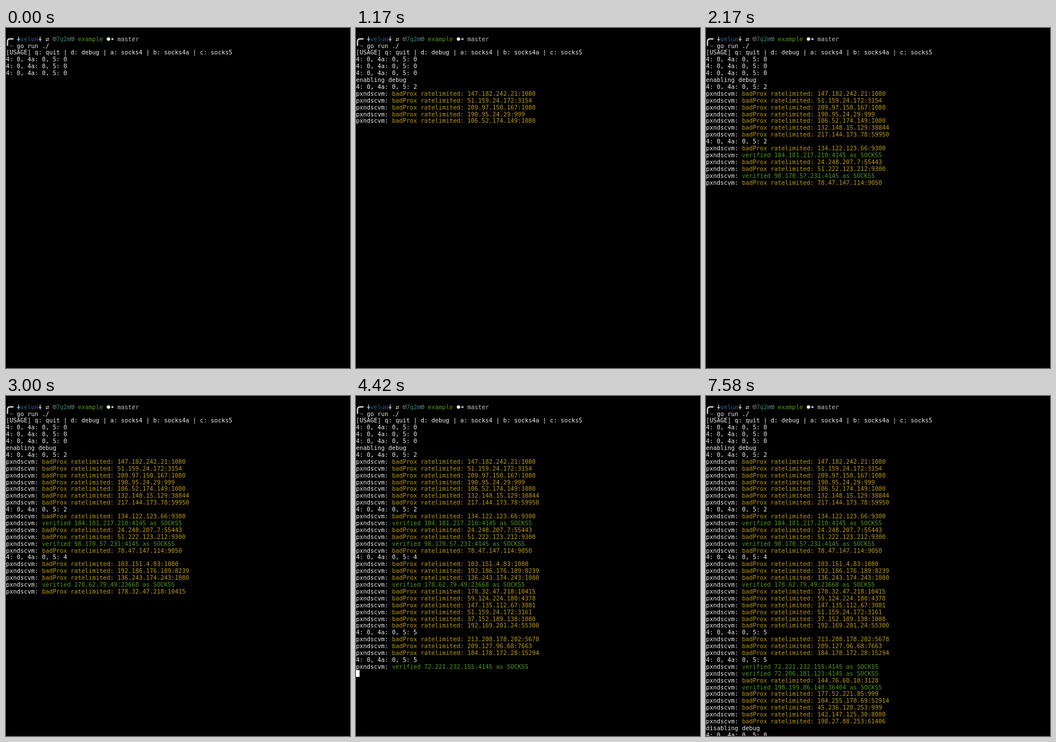
Animation of 600 by 592 pixels, one loop 8000 ms. Source, as an HTML page with a canvas:

```html
<!DOCTYPE html>
<html lang="en">
<head>
<meta charset="utf-8">
<title>Terminal session</title>
<style>
html, body { margin: 0; width: 100%; height: 100%; overflow: hidden; background: #000; }
canvas { display: block; }
</style>
</head>
<body>
<canvas id="stage" width="600" height="592"></canvas>
<script>
const ctx = document.getElementById('stage').getContext('2d');
const LOOP = 8000, CELL = 6.265, ROW = 11.9, TOP = 13.1, BASE = 9.5;
const BLINK = { start: 170, period: 1060, on: 530 };
const WHITE = '#eeeeec', YELLOW = '#bd9b0c', GREEN = '#4e9a16';

const plain = (time, text) => ({ time, text });
const tagged = (time, text, color) => ({ time, text: 'pxndscvm: ', tail: text, color });
const bad = (time, addr) => tagged(time, 'badProx ratelimited: ' + addr, YELLOW);
const good = (time, addr) => tagged(time, 'verified ' + addr + ' as SOCKS5', GREEN);
const count = (time, n) => plain(time, '4: 0, 4a: 0, 5: ' + n);

// Rows below the two prompt lines, each with the time it is printed.
const log = [
  plain(0, '[USAGE] q: quit | d: debug | a: socks4 | b: socks4a | c: socks5'),
  count(0, 0), count(0, 0), count(0, 0),
  plain(330, 'enabling debug'),
  count(330, 2),
  bad(580, '147.182.242.21:1080'),
  bad(670, '51.159.24.172:3154'),
  bad(830, '209.97.150.167:1080'),
  bad(915, '190.95.24.29:999'),
  bad(1165, '106.52.174.149:1080'),
  bad(1250, '132.148.15.129:38844'),
  bad(1330, '217.144.173.78:59950'),
  count(1330, 2),
  bad(1415, '134.122.123.66:9300'),
  good(1750, '184.181.217.210:4145'),
  bad(1915, '24.248.207.7:55443'),
  bad(2000, '51.222.123.212:9300'),
  good(2080, '98.170.57.231:4145'),
  bad(2165, '78.47.147.114:9050'),
  count(2330, 4),
  bad(2500, '103.151.4.83:1080'),
  bad(2750, '192.186.176.189:8239'),
  bad(2830, '136.243.174.243:1080'),
  good(2915, '178.62.79.49:23668'),
  bad(2995, '178.32.47.218:10415'),
  bad(3165, '59.124.224.180:4378'),
  bad(3250, '147.135.112.67:3081'),
  bad(3250, '51.159.24.172:3161'),
  bad(3330, '37.152.189.138:1080'),
  bad(3330, '192.169.201.24:55300'),
  count(3330, 5),
  bad(3500, '213.208.178.202:5678'),
  bad(3670, '209.127.96.68:7663'),
  bad(3995, '184.178.172.28:15294'),
  count(4330, 5),
  good(4415, '72.221.232.155:4145'),
  good(4500, '72.206.181.123:4145'),
  bad(4580, '144.76.60.10:3128'),
  good(4670, '198.199.86.148:36404'),
  bad(4750, '177.52.221.85:999'),
  bad(4830, '104.255.170.69:52914'),
  bad(4830, '45.236.120.253:999'),
  bad(4915, '142.147.125.30:8080'),
  bad(5000, '198.27.88.253:61406'),
  plain(5080, 'disabling debug'),
  count(5325, 8)
];

ctx.font = '20px "DejaVu Sans Mono", monospace';
const zoom = CELL / (ctx.measureText('0'.repeat(50)).width / 50);

function write(col, row, text, color) {
  ctx.save();
  ctx.translate(col * CELL, TOP + row * ROW + BASE);
  ctx.scale(zoom, zoom);
  ctx.fillStyle = color;
  ctx.fillText(text, 0, 0);
  ctx.restore();
}

function line(color, width, ...points) {
  ctx.strokeStyle = color;
  ctx.lineWidth = width;
  ctx.beginPath();
  for (const [x, y] of points) ctx.lineTo(x, y);
  ctx.stroke();
}

function dagger(col) {
  const x = (col + 0.5) * CELL;
  line(WHITE, 1.1, [x, 15], [x, 23.5]);
  line(WHITE, 1.1, [x - 2.6, 20], [x + 2.6, 20]);
}

function cube(col) {
  const x = (col + 0.5) * CELL, grey = '#a0a09c';
  line(grey, 0.7, [x, 15.8], [x + 2.8, 17.2], [x + 2.8, 20.8], [x, 22.3],
    [x - 2.8, 20.8], [x - 2.8, 17.2], [x, 15.8]);
  line(grey, 0.7, [x - 2.8, 17.2], [x, 18.7], [x + 2.8, 17.2]);
  line(grey, 0.7, [x, 18.7], [x, 22.3]);
}

function prompt() {
  ctx.strokeStyle = WHITE;
  ctx.lineWidth = 2;
  ctx.beginPath();
  ctx.moveTo(13, 19);
  ctx.lineTo(7, 19);
  ctx.quadraticCurveTo(2.6, 19, 2.6, 23.5);
  ctx.lineTo(2.6, 31);
  ctx.stroke();
  ctx.strokeStyle = '#77777a';
  ctx.lineWidth = 1;
  ctx.beginPath();
  ctx.moveTo(6.5, 30);
  ctx.quadraticCurveTo(8, 32, 12.8, 31.5);
  ctx.stroke();

  dagger(3);
  write(4, 0, 'velun', '#3a6298');
  dagger(9);
  write(11, 0, '⇄', WHITE);
  cube(13);
  write(14, 0, '7q2m', '#2f8a7c');
  cube(18);
  write(20, 0, 'example', GREEN);
  ctx.fillStyle = WHITE;
  ctx.beginPath();
  ctx.arc(178.7, 19.2, 3, 0, 7);
  ctx.fill();
  line(WHITE, 1.1, [183, 19.2], [186, 19.2]);
  ctx.beginPath();
  ctx.moveTo(185, 17);
  ctx.lineTo(188, 19.2);
  ctx.lineTo(185, 21.4);
  ctx.fill();
  write(31, 0, 'master', '#c4c4c0');
  write(3, 1, 'go run ./', WHITE);
}

function draw(t) {
  ctx.fillStyle = '#000';
  ctx.fillRect(0, 0, 600, 592);
  ctx.fillStyle = '#0a0206';
  ctx.fillRect(0, 588, 600, 4);
  prompt();

  let row = 2;
  for (const entry of log) {
    if (entry.time > t) break;
    write(0, row, entry.text, WHITE);
    if (entry.tail) write(entry.text.length, row, entry.tail, entry.color);
    row++;
  }

  const phase = t - BLINK.start;
  if (phase >= 0 && phase % BLINK.period < BLINK.on) {
    ctx.fillStyle = '#fff';
    ctx.fillRect(0, TOP + row * ROW, CELL, ROW);
  }
}

function tick() {
  draw(performance.now() % LOOP);
  requestAnimationFrame(tick);
}
tick();
</script>
</body>
</html>
```
